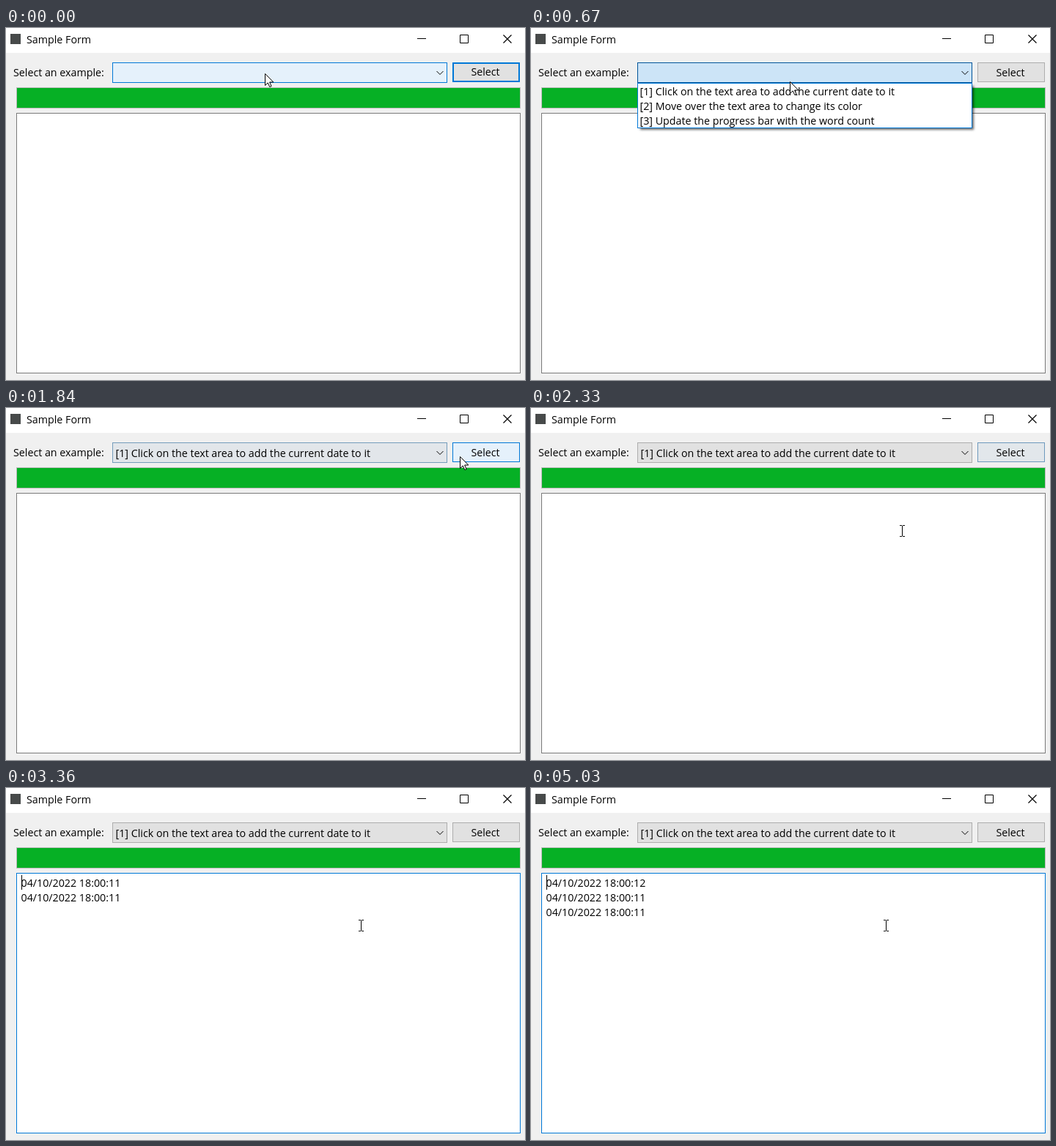
An HTML page with a canvas for the animation above (5230 ms loop, 708x481 px).

```html
<!DOCTYPE html>
<html lang="en">
<head>
<meta charset="utf-8">
<title>Sample Form</title>
<style>
  html, body { margin: 0; width: 100%; height: 100%; overflow: hidden; background: #f0f0f0; }
  canvas { display: block; }
</style>
</head>
<body>
<canvas id="stage" width="708" height="481"></canvas>
<script>
const ctx = document.getElementById('stage').getContext('2d');
const LOOP = 5230, BLINK = 530;

// Moments the mouse button goes down; it is held for HOLD ms
const HOLD = 260, OPEN = 390, PICK = 820, SELECT = 1900, WRITE = [2560, 3100, 3710];
const CLICKS = [OPEN, PICK, SELECT, ...WRITE];
const CLOSE = PICK + HOLD, LEAVE = SELECT + HOLD;

const ITEMS = [
  '[1] Click on the text area to add the current date to it',
  '[2] Move over the text area to change its color',
  '[3] Update the progress bar with the word count'
];

// Control looks: normal, hover, pressed
const FILLS = ['#e1e1e1', '#e5f1fb', '#cce4f7'];
const EDGES = ['#adadad', '#0078d7', '#005499'];
const BLUE = EDGES[1];

const ramp = (t, from, to) => Math.min(1, Math.max(0, (t - from) / (to - from)));
const easeOut = u => 1 - (1 - u) ** 3;

function tone(palette, level) {
  const low = Math.min(1, Math.floor(level)), share = (level - low) * 100;
  return `color-mix(in srgb, ${palette[low + 1]} ${share}%, ${palette[low]})`;
}

function rect(x, y, w, h, color) {
  ctx.fillStyle = color;
  ctx.fillRect(x, y, w, h);
}

function box(x, y, w, h, fill, edge, line = 1) {
  rect(x, y, w, h, edge);
  rect(x + line, y + line, w - 2 * line, h - 2 * line, fill);
}

function text(s, x, y, color = '#000', align = 'left') {
  ctx.fillStyle = color;
  ctx.textAlign = align;
  ctx.fillText(s, x, y);
}

function stroke(path, width = 1) {
  ctx.strokeStyle = '#000';
  ctx.lineWidth = width;
  ctx.stroke(new Path2D(path));
}

function drawTitleBar() {
  rect(0, 0, 708, 34, '#fff');
  rect(6, 8, 14, 14, '#474a4a');
  text('Sample Form', 28, 21);
  stroke('M561 14.5h12M619.5 9.5h11v11h-11z');
  stroke('M678.5 9.5l11 11M689.5 9.5l-11 11', 1.2);
}

function drawForm(t) {
  text('Select an example:', 10, 66);

  const combo = 1 + ramp(t, OPEN, OPEN + 70) - ramp(t, CLOSE, 1430) - ramp(t, 1700, 1910);
  box(145, 47, 457, 28, tone(FILLS, combo), tone(EDGES, combo));
  if (t >= CLOSE) text(ITEMS[0], 149.5, 67);
  stroke('M587.5 59l4.5 4.5l4.5-4.5');

  const button = ramp(t, 1630, 1770) + ramp(t, SELECT, SELECT + 70) - 2 * ramp(t, LEAVE, LEAVE + 210);
  const initial = t < OPEN;
  box(609, 47, 92, 27, tone(FILLS, button), initial ? BLUE : tone(EDGES, button), initial ? 2 : 1);
  text('Select', 654, initial ? 65 : 66, '#000', 'center');

  box(14, 81, 688, 29, '#06b025', '#bcbcbc');
}

function drawTextArea(t, pressed) {
  const focused = t >= WRITE[0];
  box(14, 116, 688, 356, '#fff', focused ? BLUE : '#7a7a7a');

  // Every release puts a new line on top
  const releases = WRITE.map(down => down + HOLD).filter(up => up <= t);
  const lines = releases.length;
  releases.forEach((_, i) => {
    const second = Math.floor(11 + i / 2);
    text('04/10/2022 18:00:' + second, 20.5, 115 + 20 * (lines - i));
  });

  const idle = lines ? t - releases[lines - 1] : 0;
  if (!focused || !pressed && Math.floor(idle / BLINK) % 2) return;
  const atEnd = pressed && lines;
  rect(atEnd ? 155 : 21, atEnd ? 99 + 20 * lines : 119, 1, 20, '#000');
}

function drawList(t, mouse) {
  if (t < OPEN + 70 || t >= CLOSE) return;
  const h = Math.round(62 * ramp(t, OPEN, OPEN + 210));
  ctx.save();
  ctx.shadowColor = 'rgba(0,0,0,.6)';
  ctx.shadowBlur = 3;
  ctx.shadowOffsetX = ctx.shadowOffsetY = 2;
  rect(147, 77, 455, h - 2, BLUE);
  ctx.restore();

  box(145, 75, 457, h, '#fff', BLUE);
  ctx.save();
  ctx.beginPath();
  ctx.rect(146, 76, 455, h - 2);
  ctx.clip();
  ITEMS.forEach((item, i) => {
    const y = 14 + h + 20 * i, active = mouse.y >= y && mouse.y < y + 20;
    if (active) rect(146, y, 455, 20, BLUE);
    text(item, 148.5, y + 16, active ? '#fff' : '#000');
  });
  ctx.restore();
}

function mouseAt(t) {
  const down = easeOut(ramp(t, 600, 900));
  const across = easeOut(ramp(t, 1150, 1700));
  const back = easeOut(ramp(t, LEAVE, 2540));
  return {
    x: Math.round(353 + 266 * across - 135 * back),
    y: Math.round(62 + 20 * down - 16 * across + 122 * back)
  };
}

function drawMouse({ x, y }, pressed) {
  ctx.save();
  ctx.translate(x, y);
  if (pressed) {
    ctx.fillStyle = 'rgba(255,255,0,.47)';
    ctx.beginPath();
    ctx.arc(0, 0, 13, 0, 2 * Math.PI);
    ctx.fill();
  }
  if (y > 116) {
    stroke('M-3 -7.5h3M1 -7.5h3M.5 -7v14M-3 7.5h3M1 7.5h3');
  } else {
    const arrow = 'M.5 .5v16l3.7-3.6 2.6 5.6 2.3-1-2.5-5.5h5.2z';
    ctx.fillStyle = '#fff';
    ctx.fill(new Path2D(arrow));
    stroke(arrow);
  }
  ctx.restore();
}

function draw(t) {
  const mouse = mouseAt(t);
  const pressed = CLICKS.some(down => t >= down && t < down + HOLD);
  // A list row lights up only once the pointer is well inside it
  ctx.font = '14.25px "Open Sans", "Noto Sans", sans-serif';
  rect(0, 0, 708, 481, '#f0f0f0');
  drawTitleBar();
  drawForm(t);
  drawTextArea(t, pressed);
  drawList(t, mouse);
  drawMouse(mouse, pressed);
}

const begin = performance.now();
function tick() {
  draw((performance.now() - begin) % LOOP);
  requestAnimationFrame(tick);
}
tick();
</script>
</body>
</html>
```
